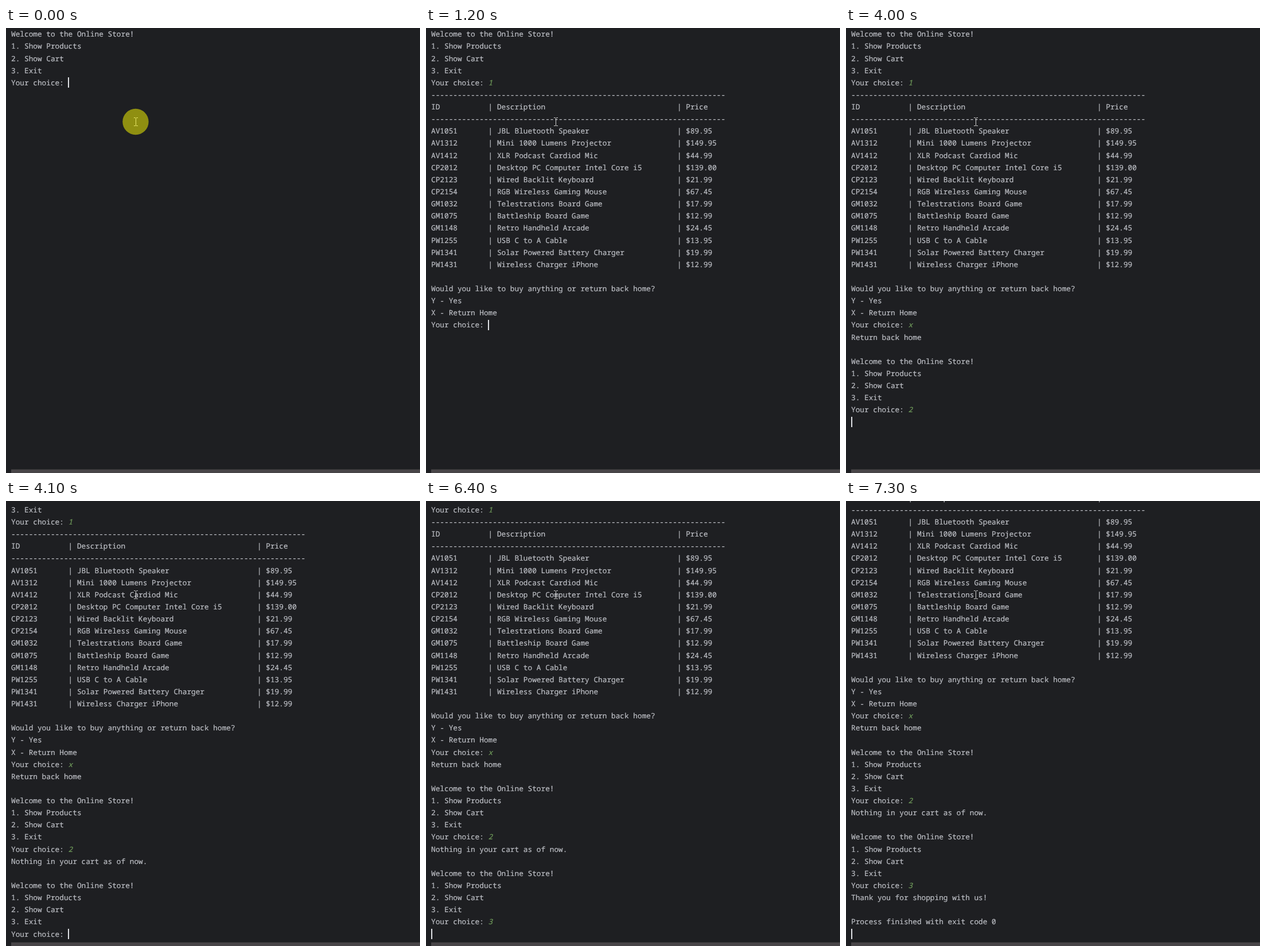
Write an HTML page that moves like this. It is 722 by 776 pixels and loops after 8000 ms.

```html
<!DOCTYPE html>
<html lang="en">
<head>
<meta charset="utf-8">
<title>Online Store console</title>
<style>
html, body { margin: 0; width: 100%; height: 100%; overflow: hidden; background: #1e1f22; }
svg { display: block; }
text {
  font: 12.78px "Noto Sans Mono", "DejaVu Sans Mono", monospace;
  fill: #bcbec4; stroke: #bcbec4; stroke-width: .22px;
  white-space: pre; text-rendering: geometricPrecision;
}
.input { fill: #6f9a5a; stroke: #6f9a5a; font-style: italic; }
</style>
</head>
<body>
<svg width="722" height="776" viewBox="0 0 722 776">
  <rect width="722" height="776" fill="#1e1f22"/>
  <g id="log"></g>
  <rect id="caret" width="2" height="18" fill="#dfe1e5"/>
  <rect x="9" y="769.7" width="713" height="6.3" fill="#484548"/>
  <path d="M223 156.5h2.5l1 1 1-1h2.5M226.5 157v13.5M223 170.5h2.5l1-1 1 1h2.5" fill="none" stroke="#d0d0d0"/>
  <circle id="halo" cx="226" cy="163.5" r="22.7" fill="#ff0"/>
</svg>
<script>
const LOOP = 8000, LEFT = 9, PITCH = 21.13, CHAR = 7.668, MAX_TOP = 744.2;
const BLINK = 1000, DARK = 450;
const PROMPT = "Your choice: ";
const menu = `Welcome to the Online Store!
1. Show Products
2. Show Cart
3. Exit
${PROMPT}`;

const rule = "-".repeat(67);
const row = (id, name, price) => id.padEnd(13) + "| " + name.padEnd(41) + "| " + price;
const products = `AV1051/JBL Bluetooth Speaker/$89.95
AV1312/Mini 1000 Lumens Projector/$149.95
AV1412/XLR Podcast Cardiod Mic/$44.99
CP2012/Desktop PC Computer Intel Core i5/$139.00
CP2123/Wired Backlit Keyboard/$21.99
CP2154/RGB Wireless Gaming Mouse/$67.45
GM1032/Telestrations Board Game/$17.99
GM1075/Battleship Board Game/$12.99
GM1148/Retro Handheld Arcade/$24.45
PW1255/USB C to A Cable/$13.95
PW1341/Solar Powered Battery Charger/$19.99
PW1431/Wireless Charger iPhone/$12.99`.split("\n").map(p => row(...p.split("/")));

const catalog = [
  rule, row("ID", "Description", "Price"), rule, ...products, "",
  "Would you like to buy anything or return back home?",
  "Y - Yes", "X - Return Home", PROMPT
].join("\n");

// console stream: keys and output are appended as they arrive;
// rest is the idle time before the caret starts to blink
const stream = [
  { at: 0, add: menu },
  { at: 600, add: "1" },
  { at: 1000, add: "\n" },
  { at: 1200, add: catalog },
  { at: 2900, add: "x" },
  { at: 3200, add: "\nReturn back home\n\n" + menu },
  { at: 3800, add: "2" },
  { at: 4000, add: "\n" },
  { at: 4100, add: "Nothing in your cart as of now.\n\n" + menu, rest: 600 },
  { at: 6100, add: "3" },
  { at: 6400, add: "\n" },
  { at: 6500, add: "Thank you for shopping with us!\n" },
  { at: 7200, add: "\nProcess finished with exit code 0\n" }
];

const $ = id => document.getElementById(id);
const log = $("log"), caret = $("caret"), halo = $("halo");

function make(tag, content, attrs) {
  const el = document.createElementNS("http://www.w3.org/2000/svg", tag);
  for (const key in attrs) el.setAttribute(key, attrs[key]);
  el.textContent = content;
  return el;
}

function lineText(line, y) {
  const asked = line.startsWith(PROMPT);
  const el = make("text", asked ? PROMPT : line, { x: LEFT, y });
  if (asked) el.append(make("tspan", line.slice(PROMPT.length), { class: "input" }));
  return el;
}

function drawLog(lines) {
  const last = lines.length - 1;
  const scroll = Math.max(0, last * PITCH - MAX_TOP);
  const top = i => i * PITCH - scroll;
  log.replaceChildren(...lines.map((line, i) => lineText(line, 15.3 + top(i))));
  caret.setAttribute("x", Math.round(8.6 + lines[last].length * CHAR));
  caret.setAttribute("y", Math.round(1.6 + top(last)));
}

let drawn = 0;
function render(t) {
  const arrived = stream.filter(chunk => chunk.at <= t);
  if (arrived.length !== drawn) {
    drawn = arrived.length;
    drawLog(arrived.map(chunk => chunk.add).join("").split("\n"));
  }

  const { at, rest = 900 } = arrived[drawn - 1];
  const idle = t - at - rest;
  caret.setAttribute("opacity", idle >= 0 && idle % BLINK < DARK ? 0 : 1);

  // click highlight fades in 100 ms steps
  halo.setAttribute("opacity", 0.5 * Math.max(0, 1 - Math.floor(t / 100) / 4));
}

const start = performance.now();
function tick() {
  render((performance.now() - start) % LOOP);
  requestAnimationFrame(tick);
}
tick();
</script>
</body>
</html>
```
